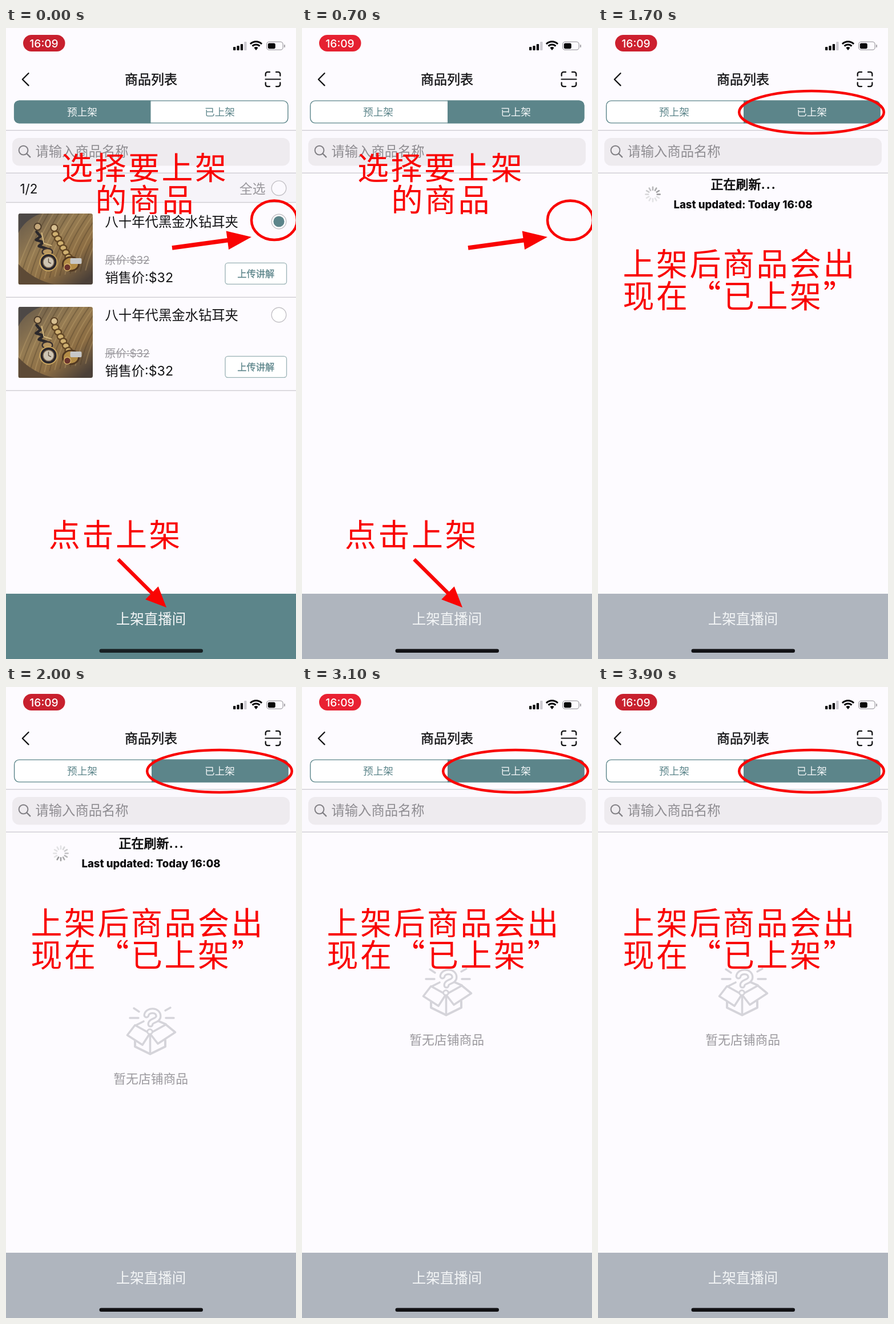
Write an HTML page with a canvas that moves like this. It is 508 px wide and 1102 px high and loops after 4000 ms.

```html
<!DOCTYPE html>
<html lang="zh">
<head>
<meta charset="utf-8">
<title>商品列表</title>
<style>
html, body { margin: 0; width: 100%; height: 100%; overflow: hidden; background: #fdfbff; }
canvas { display: block; width: 508px; height: 1102px; }
</style>
</head>
<body>
<canvas id="stage"></canvas>
<script>
const W = 508, H = 1102, LOOP = 4000, STEP = 100;
const TEAL = '#5c858a', BG = '#fdfbff', LINE = '#cfcdd3', INK = '#141416', RED = '#f90403';
const UI = 'Inter, "Noto Sans CJK SC", "Noto Sans CJK", sans-serif';
const HAN = '"Noto Sans CJK SC", "Noto Sans CJK", sans-serif';

const canvas = document.getElementById('stage');
const c = canvas.getContext('2d');
const dpr = window.devicePixelRatio || 1;
canvas.width = W * dpr;
canvas.height = H * dpr;
c.scale(dpr, dpr);

const clamp = v => Math.max(0, Math.min(1, v));
const ease = v => { v = clamp(v); return v * v * (3 - 2 * v); };

// y is the vertical middle of the glyphs
function text(s, x, y, size, color, o = {}) {
  c.font = `${o.weight || 400} ${size}px ${o.font || UI}`;
  c.textAlign = o.align || 'left';
  c.textBaseline = 'alphabetic';
  c.letterSpacing = (o.gap || 0) + 'px';
  c.fillStyle = color;
  const base = y + size * 0.36;
  c.fillText(s, x, base);
  if (o.thick) {
    c.strokeStyle = color;
    c.lineWidth = o.thick;
    c.lineJoin = 'round';
    c.strokeText(s, x, base);
  }
  c.letterSpacing = '0px';
}

function box(x, y, w, h, r, fill, stroke, lw = 1.4) {
  c.beginPath();
  c.roundRect(x, y, w, h, r);
  paint(fill, stroke, lw);
}

function paint(fill, stroke, lw) {
  if (fill) { c.fillStyle = fill; c.fill(); }
  if (stroke) { c.strokeStyle = stroke; c.lineWidth = lw; c.stroke(); }
}

function ring(x, y, rx, ry, fill, stroke, lw) {
  c.beginPath();
  c.ellipse(x, y, rx, ry, 0, 0, Math.PI * 2);
  paint(fill, stroke, lw);
}

function poly(pts, color, lw, close) {
  c.beginPath();
  pts.forEach(([x, y]) => c.lineTo(x, y));
  if (close) c.closePath();
  c.lineJoin = 'round';
  paint(null, color, lw);
}

function rule(y) {
  c.fillStyle = LINE;
  c.fillRect(0, y - 0.7, W, 1.4);
}

function statusBar(t) {
  const p = 0.5 - 0.5 * Math.cos((t + 60) / 2000 * Math.PI * 2);
  box(30, 12, 73.5, 29, 14.5, `rgb(${200 + 35 * p}, ${32 + p}, ${46 + 4 * p})`);
  text('16:09', 66.5, 26.8, 19.2, '#fff', { weight: 500, align: 'center' });
  [6, 8, 11, 15].forEach((h, i) =>
    box(398 + i * 6.4, 39 - h, 4.3, h, 1, i < 3 ? '#09090a' : '#cccad0'));

  // wifi
  c.lineCap = 'butt';
  [14.2, 9.1].forEach(r => {
    c.beginPath();
    c.arc(438, 38, r, -Math.PI * 0.75, -Math.PI * 0.25);
    paint(null, '#09090a', 3);
  });
  c.beginPath();
  c.moveTo(438, 39);
  c.arc(438, 38, 5, -Math.PI * 0.75, -Math.PI * 0.25);
  paint('#09090a');

  box(456.6, 24.2, 28.6, 14, 4.5, null, '#a3a1a6', 1.3);
  box(458.8, 26.4, 13, 9.8, 2.6, '#09090a');
  box(487, 29, 2, 5, 1, '#a3a1a6');
}

function header(second) {
  c.lineCap = 'round';
  poly([[39.5, 79], [28.8, 89.7], [39.5, 100.4]], INK, 2.3);
  text('商品列表', 254, 89.7, 23, INK, { font: HAN, align: 'center', thick: 0.4 });

  for (const sx of [-1, 1]) for (const sy of [-1, 1]) {
    c.beginPath();
    c.moveTo(467.5 + sx * 5.5, 89.5 + sy * 12.6);
    c.arcTo(467.5 + sx * 12.8, 89.5 + sy * 12.6, 467.5 + sx * 12.8, 89.5 + sy * 6, 3.5);
    c.lineTo(467.5 + sx * 12.8, 89.5 + sy * 6);
    paint(null, INK, 2.3);
  }
  poly([[454.5, 89.5], [480.5, 89.5]], INK, 2.2);

  c.save();
  c.beginPath();
  c.roundRect(14, 126.5, 480.5, 40, 9);
  c.fillStyle = '#fff';
  c.fill();
  c.clip();
  c.fillStyle = TEAL;
  if (second) c.fillRect(255, 126, 240, 41);
  else c.fillRect(14, 126, 239.5, 41);
  c.restore();
  box(14.6, 127.1, 479.3, 38.8, 8.6, null, TEAL, 1.4);
  const tab = (s, x, on) =>
    text(s, x, 147, 17.6, on ? '#f4f7f8' : TEAL, { font: HAN, align: 'center' });
  tab('预上架', 133.5, !second);
  tab('已上架', 374.5, second);
}

function search() {
  c.fillStyle = '#fbf9fe';
  c.fillRect(0, 179, W, 74);
  rule(178.7);
  rule(253.3);
  box(11, 192, 486, 48.5, 12, '#eeebef');
  ring(30.5, 213.6, 7.9, 7.9, null, '#828085', 2);
  c.lineCap = 'round';
  poly([[36.3, 219.4], [42.3, 225.4]], '#828085', 2.2);
  text('请输入商品名称', 51.5, 215.5, 23.3, '#8e8c91', { font: HAN });
}

// soft stand-in for the product photo
function photo(x, y) {
  c.save();
  c.translate(x, y);
  c.beginPath();
  c.roundRect(0, 0, 130.5, 124, 3.5);
  c.clip();
  const g = c.createLinearGradient(10, 0, 110, 124);
  g.addColorStop(0, '#675a4a');
  g.addColorStop(0.4, '#957b52');
  g.addColorStop(0.7, '#8c6d43');
  g.addColorStop(1, '#4b4038');
  c.fillStyle = g;
  c.fillRect(0, 0, 131, 124);
  c.lineCap = 'round';
  for (let i = 0; i < 15; i++) {
    const k = i * 9;
    c.beginPath();
    c.moveTo(k - 8, 124 - k * 0.2);
    c.quadraticCurveTo(k + 4, 70 - k * 0.2, k + 46, -4);
    paint(null, i % 2 ? 'rgba(60,46,30,.3)' : 'rgba(205,176,120,.3)', 2);
  }
  c.beginPath();
  c.moveTo(0, 0);
  c.lineTo(40, 0);
  c.quadraticCurveTo(12, 10, 0, 34);
  paint('#4d4846');
  c.beginPath();
  c.moveTo(0, 88);
  c.quadraticCurveTo(26, 116, 64, 124);
  c.lineTo(0, 124);
  paint('#5d4a36');

  // left earring
  ring(34, 23, 6, 6, '#c4a77a', '#4b3a28', 2);
  poly([[32, 32], [39, 40], [31, 46], [44, 50], [36, 57], [49, 61]], '#2b282b', 4.5);
  poly([[41, 34], [45, 52], [58, 56]], '#d1b57c', 2);
  ring(51, 67, 9, 6, '#b99761', '#3a3130', 2.5);
  ring(53, 85, 15, 15, '#29252a', '#c8a45f', 2);
  ring(53, 85, 9.5, 9.5, '#cfc5b4', '#85715a', 1.5);
  poly([[53, 79], [53, 85], [57, 87]], '#625345', 1.4);

  // right earring
  ring(63, 25, 6, 6, '#d7bf91', '#5b4226', 2);
  for (let i = 0; i < 6; i++)
    ring(65 + i * 4.6, 36 + i * 8, 6, 5, '#cfb070', '#624726', 2.4);
  ring(92, 88, 14, 12, '#b38c46', '#513821', 3);
  ring(86, 94, 6, 6, '#6c342c', '#d5b36a', 1.5);
  box(91, 78, 20, 10, 2, '#c7c8c8');
  c.restore();
}

function row(dy, chosen) {
  c.save();
  c.translate(0, dy);
  photo(21.5, 324);
  text('八十年代黑金水钻耳夹', 173.5, 339, 23.35, INK, { font: HAN });
  text('原价:$32', 173.5, 405.5, 18.8, '#98969b');
  c.fillStyle = '#98969b';
  c.fillRect(173.5, 405, 78, 1.3);
  text('销售价:$32', 173.5, 435.5, 23.2, INK);
  ring(478, 338, 12.8, 12.8, '#fff', '#c3c1c6', 1.4);
  if (chosen) ring(478, 338, 9.6, 9.6, TEAL);
  box(384, 410.3, 107.5, 37, 4.5, '#fff', '#9ab2b5', 1.3);
  text('上传讲解', 437.7, 429, 16.3, TEAL, { font: HAN, align: 'center', thick: 0.3 });
  rule(470.3);
  c.restore();
}

function list() {
  c.fillStyle = '#f6f4f9';
  c.fillRect(0, 254, W, 50);
  rule(304.6);
  text('1/2', 24.5, 280.7, 22.4, INK);
  text('全选', 409, 280.5, 22.8, '#99979c', { font: HAN });
  ring(478, 279.7, 12.8, 12.8, '#fbf9fe', '#c3c1c6', 1.4);
  row(0, true);
  row(163, false);
}

function refresh(t, dy) {
  c.save();
  c.beginPath();
  c.rect(0, 254, W, 734);
  c.clip();
  c.translate(0, dy);
  text('正在刷新', 197.5, 272.8, 22, '#0d0d0e', { font: HAN, thick: 0.8 });
  text('...', 285.5, 272.8, 22, '#0d0d0e', { weight: 700, gap: 1.6 });
  text('Last updated: Today 16:08', 254, 308.8, 18.6, '#0d0d0e', { weight: 800, align: 'center' });
  const head = Math.round((t - 1200) / 1000 * 12) + 6;
  c.lineCap = 'round';
  for (let i = 0; i < 12; i++) {
    const age = ((head - i) % 12 + 12) % 12, a = i * Math.PI / 6;
    const x = Math.cos(a), y = Math.sin(a);
    const v = Math.round(150 + 76 * clamp(age / 7));
    poly([[96 + x * 7.8, 290.5 + y * 7.8], [96 + x * 12.6, 290.5 + y * 12.6]],
      `rgb(${v}, ${v}, ${v + 2})`, 2.6);
  }
  c.restore();
}

function emptyState(dy) {
  const tone = '#d5d4da';
  c.save();
  c.translate(0, dy);
  c.lineCap = 'round';
  poly([[226, 550], [226, 560], [252.5, 573], [279, 560], [279, 549]], tone, 4);
  poly([[252.5, 537], [252.5, 572]], tone, 3.6);
  poly([[227, 523], [241, 516]], tone, 3.6);
  poly([[280, 521], [266, 515]], tone, 3.6);
  poly([[212.5, 540], [226, 522.5], [252, 537], [239, 557]], tone, 3.6, true);
  poly([[296.5, 535], [280, 521.5], [252, 537], [266, 555]], tone, 3.6, true);
  for (const [color, w] of [[tone, 11], [BG, 4.4]]) {
    c.beginPath();
    c.moveTo(246, 505);
    c.bezierCurveTo(248, 495, 267, 495, 267, 507);
    c.bezierCurveTo(267, 515, 253, 514, 253, 521);
    paint(null, color, w);
  }
  ring(252, 534, 4.4, 4.2, BG, tone, 3);
  [[217, 510, 232, 510], [280, 510, 294, 510], [224, 493, 233, 499], [279, 497, 288, 492]]
    .forEach(([x1, y1, x2, y2]) => poly([[x1, y1], [x2, y2]], tone, 3.4));
  text('暂无店铺商品', 253.7, 616, 21.8, '#9b999e', { font: HAN, align: 'center' });
  c.restore();
}

function footer(second) {
  c.fillStyle = second ? '#afb5be' : TEAL;
  c.fillRect(0, 988, W, 114);
  text('上架直播间', 254, 1032, 24.5, '#f4f6f7', { font: HAN, align: 'center' });
  box(163.5, 1084.5, 181.5, 6.6, 3.3, second ? '#111114' : '#182023');
}

function note(s, x, y) {
  text(s, x, y, 55, RED, { font: HAN, gap: 3.5 });
}

function arrow(x1, y1, x2, y2, lw, head, half) {
  const a = Math.atan2(y2 - y1, x2 - x1), len = Math.hypot(x2 - x1, y2 - y1);
  c.save();
  c.translate(x1, y1);
  c.rotate(a);
  c.fillStyle = RED;
  c.fillRect(0, -lw / 2, len - head + 2, lw);
  c.beginPath();
  c.moveTo(len, 0);
  c.lineTo(len - head, -half);
  c.lineTo(len - head, half);
  c.fill();
  c.restore();
}

function chooseNotes() {
  note('选择要上架', 97, 244);
  note('的商品', 156.5, 300.5);
  note('点击上架', 75, 885);
  ring(470, 335.8, 40, 34.2, null, RED, 4.6);
  arrow(291, 384, 430, 365, 7.4, 42.5, 16.3);
  arrow(196.5, 928, 281, 1012, 6.4, 36, 16);
}

function resultNotes() {
  ring(374, 147, 126.8, 37, null, RED, 4.5);
  note('上架后商品会出', 43.5, 412.5);
  note('现在“已上架”', 43.5, 468.5);
}

function draw(t) {
  const second = t >= 700;
  c.fillStyle = BG;
  c.fillRect(0, 0, W, H);
  statusBar(t);
  header(second);
  search();
  if (!second) list();

  const close = ease((t - 2000) / 400);
  if (t > 700 && t < 2400)
    refresh(t, -72 * (1 - ease((t - 700) / 400)) - 72 * close);
  if (t >= 2000) {
    const nudge = -7.5 * Math.sin(Math.PI * clamp((t - 3300) / 400));
    emptyState(68 * (1 - close) + nudge);
  }

  footer(second);
  if (t < 1000) chooseNotes();
  if (t >= 1500) resultNotes();
}

const start = performance.now();
function tick() {
  const t = (performance.now() - start) % LOOP;
  draw(Math.floor(t / STEP) * STEP);
  requestAnimationFrame(tick);
}
tick();
</script>
</body>
</html>
```
